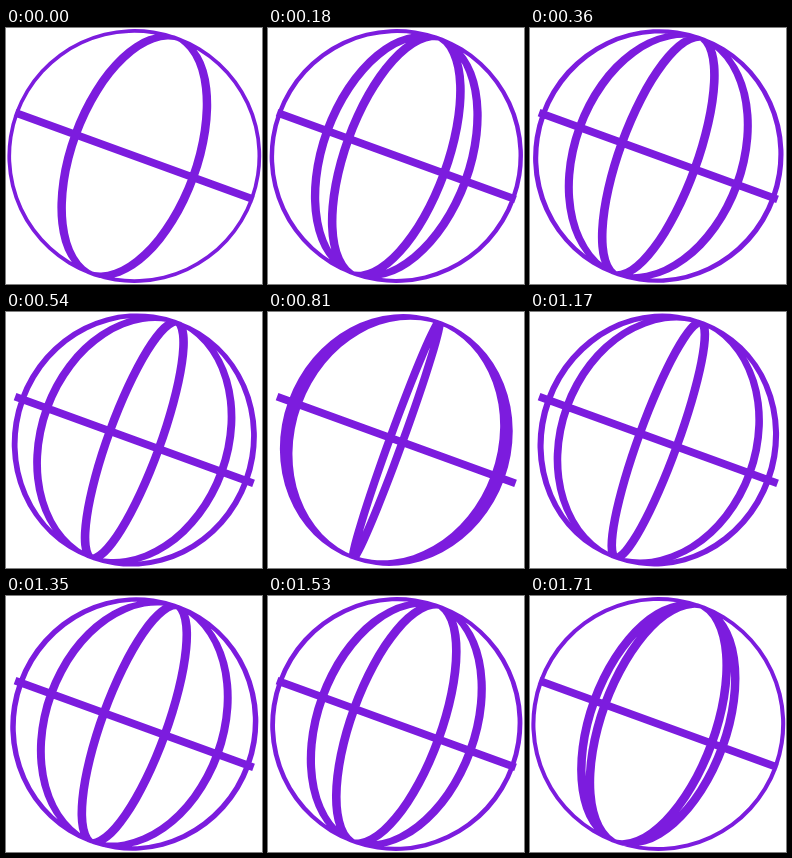
Recreate the animation shown at these times as an HTML page with a canvas. Size 256 by 256 pixels, loop 1.8 s.

```html
<!DOCTYPE html>
<html lang="en">
<head>
<meta charset="utf-8">
<title>Turning globe</title>
<style>
  html, body { margin: 0; width: 100%; height: 100%; overflow: hidden; background: #fff; }
  canvas { display: block; width: 100%; height: 100%; }
</style>
</head>
<body>
<canvas id="stage" width="256" height="256"></canvas>
<script>
const ctx = document.getElementById('stage').getContext('2d');
const LOOP = 1800, STEP = 90;
const OUTER = 126.9, INNER = 123.2, BAND = 7.8;
const RAD = Math.PI / 180, QUARTER = Math.PI / 2;

// Silhouette of one half of a flat band around the globe, seen at the given angle.
function halfBand(squash, shift) {
  ctx.moveTo(-shift, -OUTER);
  ctx.lineTo(shift, -OUTER);
  ctx.ellipse(shift, 0, OUTER * squash, OUTER, 0, -QUARTER, QUARTER);
  ctx.lineTo(-shift, OUTER);
  ctx.lineTo(-shift, INNER);
  ctx.ellipse(-shift, 0, INNER * squash, INNER, 0, QUARTER, -QUARTER, true);
  ctx.closePath();
}

function meridian(degrees) {
  const squash = Math.abs(Math.cos(degrees * RAD));
  const shift = Math.abs(Math.sin(degrees * RAD)) * BAND / 2;
  halfBand(squash, shift);
  ctx.rotate(Math.PI);
  halfBand(squash, shift);
  ctx.rotate(-Math.PI);
}

function draw(time) {
  const turn = Math.floor((time % LOOP) / STEP) * STEP / LOOP * 60;
  ctx.setTransform(1, 0, 0, 1, 0, 0);
  ctx.fillStyle = '#fff';
  ctx.fillRect(0, 0, 256, 256);
  ctx.translate(128.3, 128);
  ctx.rotate(20 * RAD);
  ctx.beginPath();
  for (const offset of [0, 60, 120]) meridian(turn + offset);
  ctx.rect(-OUTER, -BAND / 2, OUTER * 2, BAND);
  ctx.fillStyle = '#7c1cde';
  ctx.fill();
}

const start = performance.now();
function tick() {
  draw(performance.now() - start);
  requestAnimationFrame(tick);
}
tick();
</script>
</body>
</html>
```
